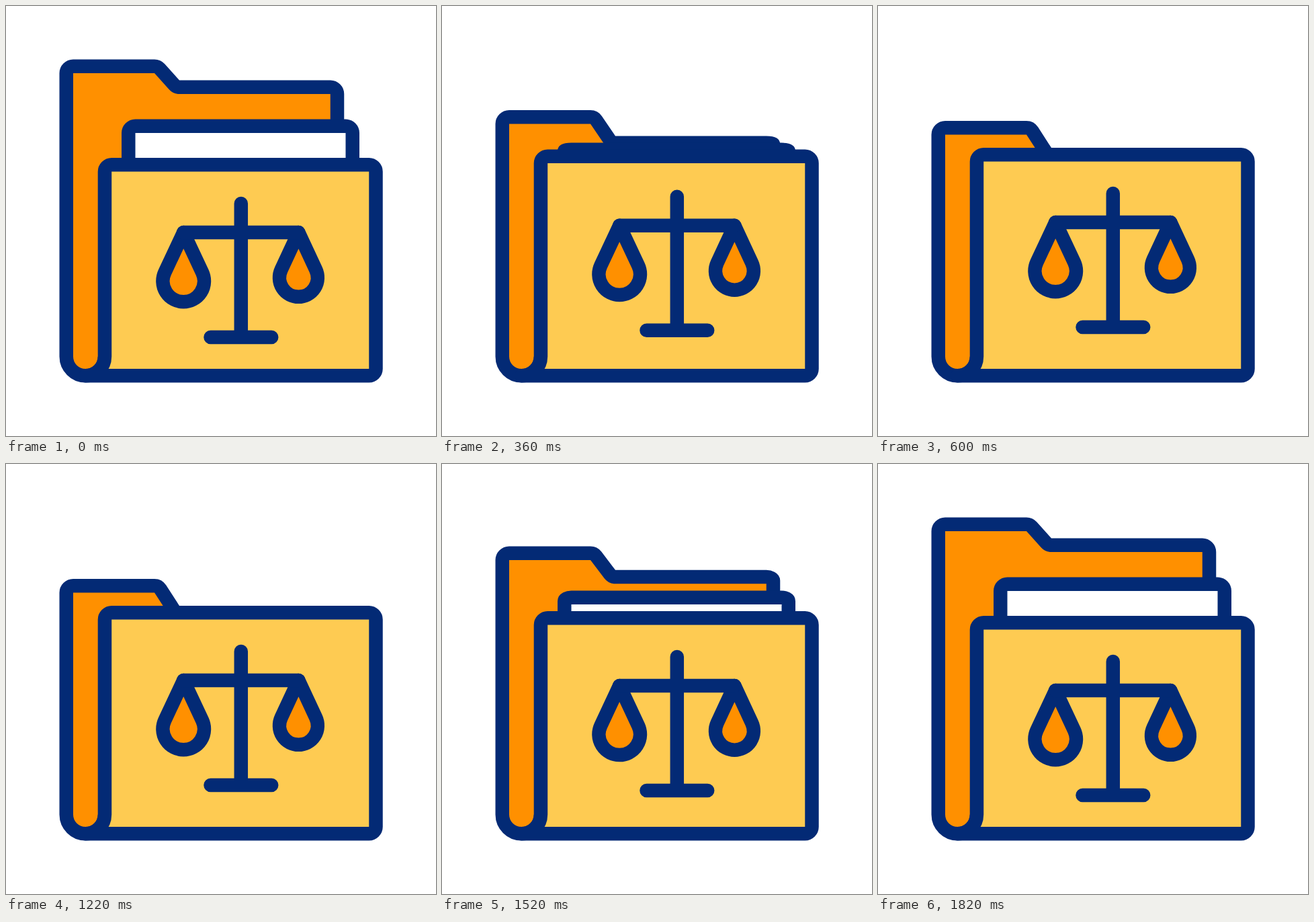
An HTML page that plays this animation: 640 px wide and 640 px high, repeating every 2420 ms.

```html
<!DOCTYPE html>
<html lang="en">
<head>
<meta charset="utf-8">
<title>Law folder</title>
<style>
  html, body { margin: 0; width: 100%; height: 100%; overflow: hidden; background: #fff; }
  svg { display: block; width: 100vw; height: 100vh; }
  path { stroke: #032a75; stroke-width: 20.5; stroke-linejoin: round; }
  .orange { fill: #ff9000; }
  .white { fill: #fff; }
  .yellow { fill: #fecb52; }
  .line { fill: none; stroke-linecap: round; }
</style>
</head>
<body>
<svg viewBox="0 0 640 640">
  <path id="back" class="orange"/>
  <path id="paper" class="white"/>
  <path id="front" class="yellow"/>
  <g id="scales">
    <path id="panL" class="orange"/>
    <path id="panR" class="orange"/>
    <path class="line" d="M264.2 337H435.4M349.8 294V493M304.5 493H395.2"/>
  </g>
</svg>
<script>
const LOOP = 2420, STEP = 20, MOVE = LOOP / 4;
const R = 10.25;
const $ = id => document.getElementById(id);
const mix = (a, b, p) => a + (b - a) * p;

function bezier(x1, y1, x2, y2) {
  const at = (a, b, s) => 3 * (1 - s) * (1 - s) * s * a + 3 * (1 - s) * s * s * b + s * s * s;
  return x => {
    if (x <= 0) return 0;
    if (x >= 1) return 1;
    let lo = 0, hi = 1;
    for (let i = 0; i < 30; i++) {
      const mid = (lo + hi) / 2;
      if (at(x1, x2, mid) < x) lo = mid; else hi = mid;
    }
    return at(y1, y2, lo);
  };
}
const easeOut = bezier(.2, .25, .5, 1);
const easeInOut = bezier(.45, 0, .54, 1);

// Teardrop: two tangents from the apex to a circle
function drop(x, top, cy, r) {
  const a = Math.asin(r / (cy - top));
  const dx = r * Math.cos(a), y = cy - r * Math.sin(a);
  return `M${x} ${top}L${x - dx} ${y}A${r} ${r} 0 1 0 ${x + dx} ${y}Z`;
}

// p: 0 open, 1 closed
function backPath(p) {
  const tab = mix(100, 191.5, p), notch = mix(110.5, 211, p);
  const side = mix(131, 221.5, p), shelf = notch + R;
  const dx = 37, dy = notch - tab;
  const dir = Math.atan2(dy, dx) + Math.asin(2 * R / Math.hypot(dx, dy));
  const nx = R * Math.sin(dir), ny = R * Math.cos(dir);
  return `M493 236V${side}A${R} ${side - shelf} 0 0 0 482.75 ${shelf}H258` +
    `A${R} ${R} 0 0 1 ${258 - nx} ${notch + ny}L${221 + nx} ${tab - ny}` +
    `A${R} ${R} 0 0 0 221 ${tab - R}H100A${R} ${R} 0 0 0 89.75 ${tab}` +
    `V521.7A28.6 28.6 0 0 0 146.95 521.7`;
}

function paperPath(p) {
  const top = mix(178.75, 221.25, p), side = mix(189, 221.5, p), ry = side - top;
  return `M182.25 238V${side}A${R} ${ry} 0 0 1 192.5 ${top}H505.5` +
    `A${R} ${ry} 0 0 1 515.75 ${side}V238`;
}

function frontPath(p) {
  const y = mix(246.4, 231.5, p), arc = `A${R} ${R} 0 0 1 `;
  return `M118.35 550.3A28.6 28.6 0 0 0 146.95 521.7V${y}${arc}157.2 ${y - R}` +
    `H540.25${arc}550.5 ${y}V540.05${arc}540.25 550.3Z`;
}

function draw(t) {
  const shut = t < LOOP / 2;
  const x = Math.min(1, (shut ? t : t - LOOP / 2) / MOVE);
  const swing = easeInOut(x);
  const fold = shut ? easeOut(x) : 1 - swing;
  const lift = shut ? swing : 1 - swing;
  $('back').setAttribute('d', backPath(fold));
  $('paper').setAttribute('d', paperPath(fold));
  $('front').setAttribute('d', frontPath(fold));
  $('scales').setAttribute('transform', `translate(0 ${-15 * lift})`);
}

function tick() {
  const t = performance.now() % LOOP;
  draw(Math.floor(t / STEP) * STEP);
  requestAnimationFrame(tick);
}

$('panL').setAttribute('d', drop(264.2, 337, 409.4, 30.75));
$('panR').setAttribute('d', drop(435.4, 337, 404.4, 28.4));
draw(0);
requestAnimationFrame(tick);
</script>
</body>
</html>
```
